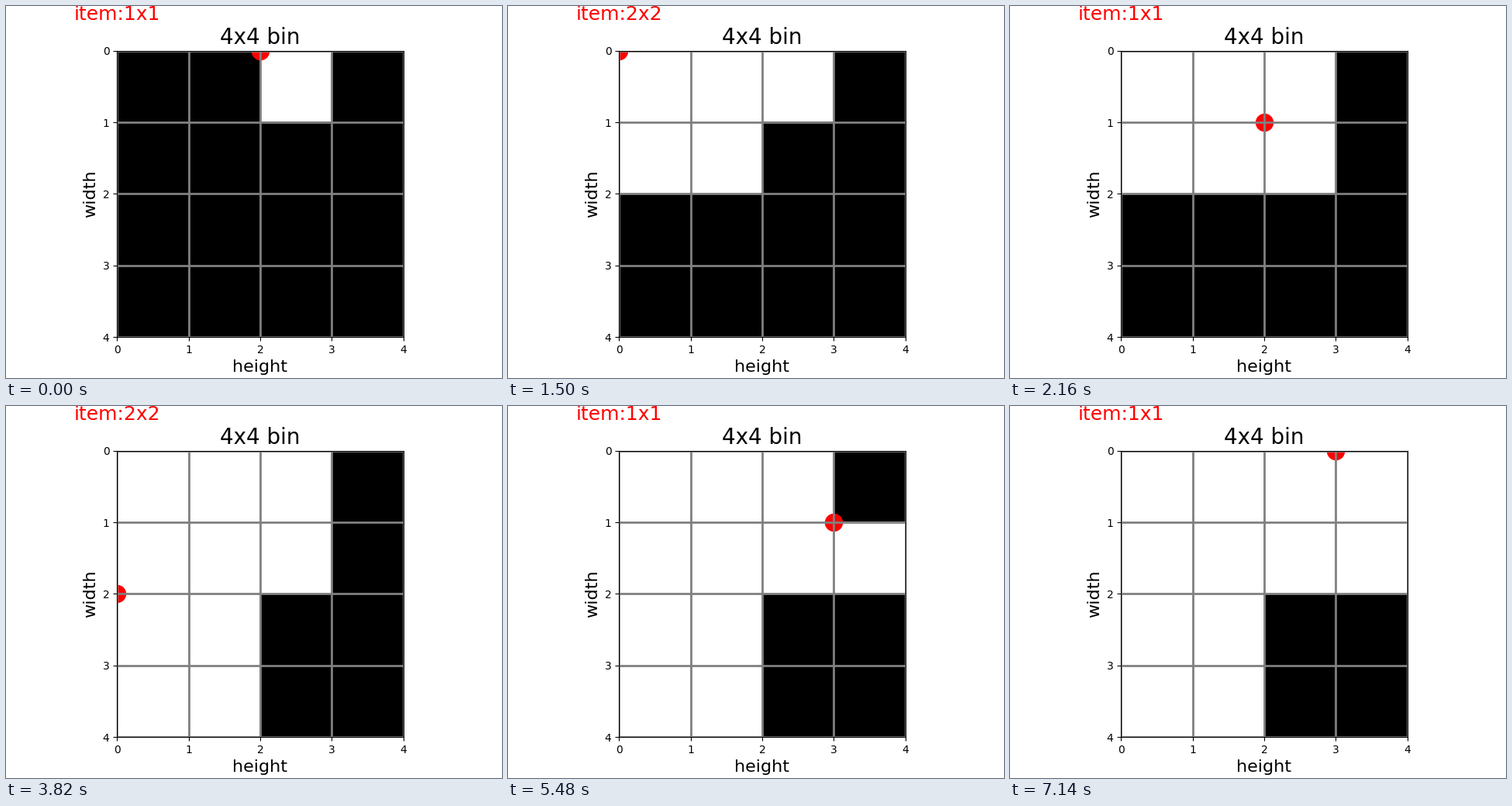
A matplotlib script that plays this animation: 640x480 px, repeating every 8000 ms.

```python
import numpy as np
import matplotlib.pyplot as plt
from matplotlib.animation import FuncAnimation

LOOP_MS = 8000
STEP_MS = 20
ITEM_MS = 1660
FIRST_ITEM_MS = 500
BIN_SIZE = 4
HALF = BIN_SIZE // 2
ITEM_SIZES = [1, 2, 1, 2, 1, 1]


def pack(sizes):
    """Stack large items down the left half, snake small ones through the top right."""
    placements = []
    for i, size in enumerate(sizes):
        count = sizes[:i].count(size)
        if size == HALF:
            row, col = count * HALF, 0
        else:
            lane, step = divmod(count, HALF)
            row = step if lane % 2 == 0 else HALF - 1 - step
            col = HALF + lane
        placements.append((row, col, size))
    return placements


placements = pack(ITEM_SIZES)

plt.rcParams["font.family"] = "DejaVu Sans"
fig, ax = plt.subplots(figsize=(6.4, 4.8), dpi=100)
image = ax.imshow(np.zeros((BIN_SIZE, BIN_SIZE)), cmap="gray", vmin=0, vmax=1,
                  extent=(0, BIN_SIZE, BIN_SIZE, 0), interpolation="nearest")
corner = ax.scatter([0], [0], s=250, color="red")
label = ax.text(-0.6, -0.43, "", color="red", fontsize=18)

ax.set_title(f"{BIN_SIZE}x{BIN_SIZE} bin", fontsize=20)
ax.set_xlabel("height", fontsize=16)
ax.set_ylabel("width", fontsize=16)
ax.set_xticks(range(BIN_SIZE + 1))
ax.set_yticks(range(BIN_SIZE + 1))
ax.set_xlim(0, BIN_SIZE)
ax.set_ylim(BIN_SIZE, 0)
ax.grid(color="gray", linewidth=2)


def update(frame):
    current = (frame * STEP_MS + ITEM_MS - FIRST_ITEM_MS) // ITEM_MS
    cells = np.zeros((BIN_SIZE, BIN_SIZE))
    for row, col, size in placements[:current + 1]:
        cells[row:row + size, col:col + size] = 1
    image.set_data(cells)

    row, col, size = placements[current]
    corner.set_offsets([(col, row)])
    label.set_text(f"item:{size}x{size}")
    return image, corner, label


anim = FuncAnimation(fig, update, frames=LOOP_MS // STEP_MS,
                     interval=STEP_MS, repeat=True)
plt.show()
```
